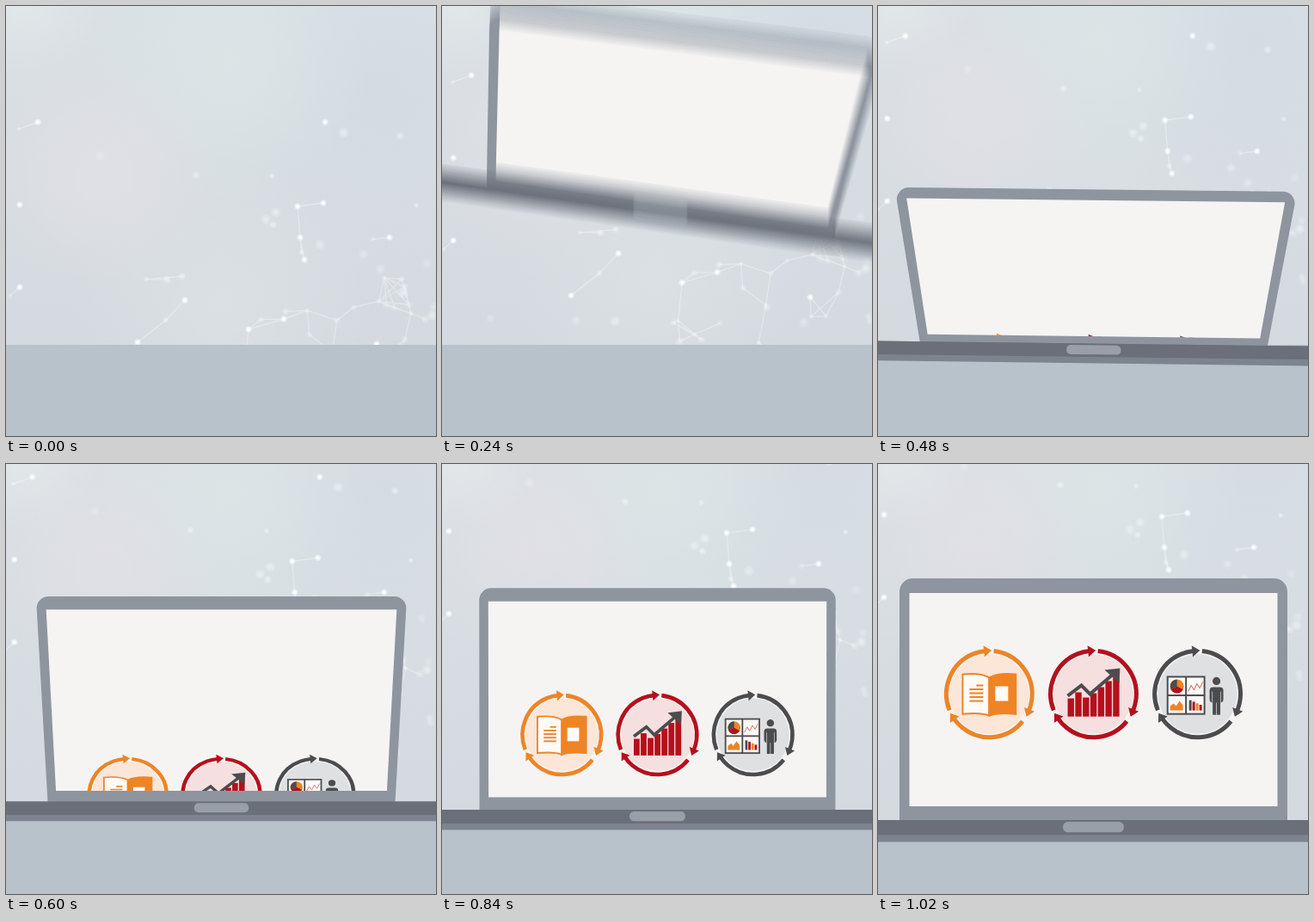
Recreate the animation shown at these times as an HTML page with a canvas. Size 500 by 500 pixels, loop 1.05 s.

```html
<!DOCTYPE html>
<html lang="en">
<head>
<meta charset="utf-8">
<title>Laptop drop</title>
<style>
html, body { margin: 0; width: 100%; height: 100%; overflow: hidden; background: #d8dee2; }
canvas { display: block; width: 100%; height: 100%; }
</style>
</head>
<body>
<canvas id="stage" width="500" height="500"></canvas>
<script>
const SIZE = 500, LOOP = 1050, STEP = 30, SAMPLES = 14, SHUTTER = 18;
const LANDED = 407, ZOOM_START = 600, ZOOM_TIME = 420;
const ORANGE = '#ee8426', RED = '#b5101c', DARK = '#4c4c4f';
const makeLayer = () => Object.assign(document.createElement('canvas'), { width: SIZE, height: SIZE }).getContext('2d');
const ctx = document.getElementById('stage').getContext('2d');
const scene = makeLayer(), sample = makeLayer();

const lerp = (a, b, u) => a + (b - a) * u;
const clamp = u => Math.max(0, Math.min(1, u));

let seed = 11;
const random = () => (seed = (seed * 16807) % 2147483647) / 2147483647;

// The brightest points; the rest of the network is scattered around them
const STARS = [[37, 135], [16, 231], [371, 135], [16, 327], [339, 233], [369, 229], [342, 269],
  [347, 295], [446, 269], [208, 342], [153, 391], [282, 376], [323, 364], [431, 393]];
const DOTS = STARS.map(([x, y]) => ({ x, y, r: 4.5, alpha: 0.95 }));
for (let i = 0; i < 60; i++) {
  DOTS.push({
    x: SIZE * Math.sqrt(random()), y: 90 + 370 * Math.sqrt(random()),
    r: 3 + 4 * random(), alpha: 0.2 + 0.25 * random()
  });
}
const LINKS = DOTS.flatMap((a, i) => DOTS.slice(i + 1)
  .filter(b => Math.hypot(a.x - b.x, a.y - b.y) < 45 && a.r + b.r < 9.2)
  .map(b => [a, b]));

function glow(g, x, y, r, color, alpha, core = 0) {
  const fill = g.createRadialGradient(x, y, r * core, x, y, r);
  fill.addColorStop(0, `rgba(${color},${alpha})`);
  fill.addColorStop(1, `rgba(${color},0)`);
  g.fillStyle = fill;
  g.fillRect(x - r, y - r, 2 * r, 2 * r);
}

function drawBackground(g, t) {
  const u = t / 1020, k = 1.45 * u - 0.45 * u * u, lift = 110 * k;
  const sky = g.createLinearGradient(0, 0, 0, 420);
  sky.addColorStop(0, '#dae0e4');
  sky.addColorStop(1, '#d3d9de');
  g.fillStyle = sky;
  g.fillRect(0, 0, SIZE, SIZE);
  glow(g, 440, 100 - lift, 190, '210,217,227', 0.7);
  glow(g, 260, 65 - lift / 3, 160, '219,231,230', 0.7);
  glow(g, 115, 195 - lift, 140, '226,224,230', 0.7, 0.2);
  glow(g, 250, 350 - lift, 170, '221,226,230', 0.7);
  glow(g, 20, -10, 90, '232,236,236', 0.6);

  const at = ({ x, y }) => [x - 9 * k, y - 172 * k];
  g.strokeStyle = 'rgba(255,255,255,.3)';
  g.lineWidth = 1.4;
  g.beginPath();
  for (const [a, b] of LINKS) {
    g.moveTo(...at(a));
    g.lineTo(...at(b));
  }
  g.stroke();
  for (const dot of DOTS) glow(g, ...at(dot), dot.r, '255,255,255', dot.alpha, 0.25);
}

// The laptop drops while rocking sideways and folding, then opens and grows
function poseAt(t) {
  const z = clamp((t - ZOOM_START) / ZOOM_TIME);
  const drop = Math.max(0, (LANDED - t) / 287) ** 1.25;
  const tilt = t > 0 && t < 530 ? 72 * Math.sin(Math.PI * t / 530) ** 2 : 0;
  const flare = Math.exp(-(((t - 380) / 212) ** 2)), fold = flare * flare;
  const width = 404 + 47 * z ** 2.8;
  const baseY = 392.5 + 21.5 * z ** 1.45 - 321.5 * drop;
  const height = width * 0.623 * (1 - 0.45 * fold);
  const middle = 250.5 + 0.05 * tilt, lean = 0.42 * tilt, spread = 40 * flare;
  const x0 = middle - width / 2, x1 = middle + width / 2;
  const edge = x => baseY + tilt * (x / SIZE - 0.5);
  const lid = [
    [x0 + lean - spread, edge(x0) - height],
    [x1 + lean + spread, edge(x1) - height],
    [x1, edge(x1) + 1],
    [x0, edge(x0) + 1]
  ];
  return { lid, edge, width, middle, tilt, thick: width * 0.0565 };
}

// Point on a quad, with rows foreshortened towards the narrower end
function onQuad([a, b, c, d], u, v) {
  const far = v * (b[0] - a[0]), row = far / (far + (1 - v) * (c[0] - d[0]));
  return [0, 1].map(i => lerp(lerp(a[i], b[i], u), lerp(d[i], c[i], u), row));
}

function polygon(g, points, fill) {
  g.beginPath();
  points.forEach(p => g.lineTo(...p));
  g.closePath();
  if (fill) { g.fillStyle = fill; g.fill(); }
}

function bar(g, color, ...box) {
  g.fillStyle = color;
  g.fillRect(...box);
}

function wedge(g, color, x, y, r, from = 0, to = 7) {
  g.fillStyle = color;
  g.beginPath();
  g.moveTo(x, y);
  g.arc(x, y, r, from, to);
  g.fill();
}

function ring(g, color, tint) {
  wedge(g, tint, 0, 0, 46);
  g.strokeStyle = color;
  g.lineWidth = 5;
  for (const end of [22, 145, 264]) {
    g.save();
    g.rotate(end * Math.PI / 180);
    g.beginPath();
    g.arc(0, 0, 50, -1.85, 0);
    g.stroke();
    polygon(g, [[43.5, -1], [56.5, -1], [50, 8]], color);
    g.restore();
  }
}

function book(g) {
  g.lineWidth = 2;
  g.strokeStyle = ORANGE;
  for (const [side, fill] of [[-1, '#fffaf6'], [1, ORANGE]]) {
    g.fillStyle = fill;
    g.beginPath();
    g.moveTo(side * 31, -23);
    g.quadraticCurveTo(side * 9, -25, 0, -19);
    g.lineTo(0, 25);
    g.quadraticCurveTo(side * 9, 21, side * 31, 23);
    g.closePath();
    g.fill();
    g.stroke();
  }
  bar(g, '#fffaf6', 7, -9, 15, 17);
  for (let i = 0; i < 5; i++) bar(g, ORANGE, i ? -23 : -15, -11 + i * 4.5, i ? 16 : 8, 2);
}

function growth(g) {
  [5, -2, 4, -1, -8, -15, -21].forEach((top, i) => bar(g, RED, -30 + i * 8.8, top, 7.4, 26 - top));
  g.strokeStyle = DARK;
  g.lineWidth = 4;
  polygon(g, [[13, -28], [31, -30], [30, -13]], DARK);
  g.beginPath();
  [[-30, 2], [-14, -10], [-4, 0], [24, -24]].forEach(p => g.lineTo(...p));
  g.stroke();
}

function board(g) {
  bar(g, DARK, -36, -21, 45, 45);
  for (const x of [-34, -12.5]) for (const y of [-19, 2.5]) bar(g, '#fbfaf9', x, y, 19.5, 19.5);
  wedge(g, ORANGE, -24, -9, 8);
  wedge(g, RED, -24, -9, 8, 0.5, 2.7);
  wedge(g, DARK, -24, -9, 8, 2.7, 4.71);
  g.strokeStyle = '#d46a60';
  g.lineWidth = 1;
  g.beginPath();
  for (let i = 0; i < 6; i++) g.lineTo(-11 + i * 3.4, -5 - i + (i % 2 ? -4 : 2));
  g.stroke();
  polygon(g, [[-32, 19], [-32, 14], [-28, 11], [-25, 14], [-21, 8], [-17, 13], [-17, 19]], ORANGE);
  [DARK, RED, ORANGE, RED].forEach((color, i) => bar(g, color, -10 + i * 4, 7 + i * 1.8, 3, 12 - i * 1.8));

  wedge(g, DARK, 22, -15, 4.6);
  g.beginPath();
  g.roundRect(14, -8, 16, 18, 4);
  g.fill();
  for (const side of [-1, 1]) {
    bar(g, DARK, 22 + side * 2.4 - 2.05, 4, 4.1, 20);
    bar(g, '#dedfe0', 22 + side * 4.8 - 0.35, -3, 0.7, 13);
  }
}

const ICONS = [
  [ORANGE, '#fbe6d8', book],
  [RED, '#f6dfdf', growth],
  [DARK, '#dfe0e1', board]
];

function drawIcons(g, screen, t) {
  const tau = t - ZOOM_START, row = 1.015 - 0.00153 * tau + 5.75e-7 * tau * tau;
  if (row > 1.25) return;
  g.save();
  polygon(g, screen);
  g.clip();
  const [left, right] = [0, 1].map(u => onQuad(screen, u, row)[0]);
  const [above, below] = [-0.1, 0.1].map(v => onQuad(screen, 0.5, row + v)[1]);
  ICONS.forEach(([color, tint, art], i) => {
    g.save();
    g.translate(...onQuad(screen, 0.217 + 0.283 * i, row));
    g.scale((right - left) / 429, (below - above) / 0.2 / 247);
    ring(g, color, tint);
    art(g);
    g.restore();
  });
  g.restore();
}

function drawLaptop(g, t) {
  const { lid, edge, width, middle, tilt, thick } = poseAt(t);
  const [a, b, c, d] = lid;
  const screen = [[0.0255, 0.06], [0.9745, 0.06], [0.9745, 0.94], [0.0255, 0.94]].map(p => onQuad(lid, ...p));

  g.fillStyle = '#8e959f';
  g.beginPath();
  g.moveTo(...d);
  g.arcTo(...a, ...b, width * 0.034);
  g.arcTo(...b, ...c, width * 0.034);
  g.lineTo(...c);
  g.fill();
  polygon(g, screen, '#f5f4f3');
  drawIcons(g, screen, t);

  const hinge = width * 0.157;
  g.save();
  g.transform(1, tilt / SIZE, 0, 1, 0, edge(0));
  bar(g, '#7d838f', 0, 0, SIZE, thick);
  bar(g, '#6b6f7a', 0, 0, SIZE, thick * 0.68);
  g.fillStyle = '#989fa8';
  g.beginPath();
  g.roundRect(middle - hinge / 2, thick * 0.08, hinge, thick * 0.48, thick * 0.22);
  g.fill();
  g.restore();
}

function draw(t) {
  const table = Math.max(394, poseAt(t).edge(0) + 2);
  drawBackground(scene, t);
  bar(scene, '#b8c2cb', 0, table, SIZE, SIZE - table);
  const count = t < LANDED ? SAMPLES : 1;
  // Running average over the shutter time
  for (let i = 0; i < count; i++) {
    sample.drawImage(scene.canvas, 0, 0);
    drawLaptop(sample, count > 1 ? t + SHUTTER * (i / (count - 1) - 0.5) : t);
    ctx.globalAlpha = 1 / (i + 1);
    ctx.drawImage(sample.canvas, 0, 0);
  }
}

const start = performance.now();
let shown = -1;
function tick() {
  const t = Math.floor(((performance.now() - start) % LOOP) / STEP) * STEP;
  if (t !== shown) draw(shown = t);
  requestAnimationFrame(tick);
}
tick();
</script>
</body>
</html>
```
